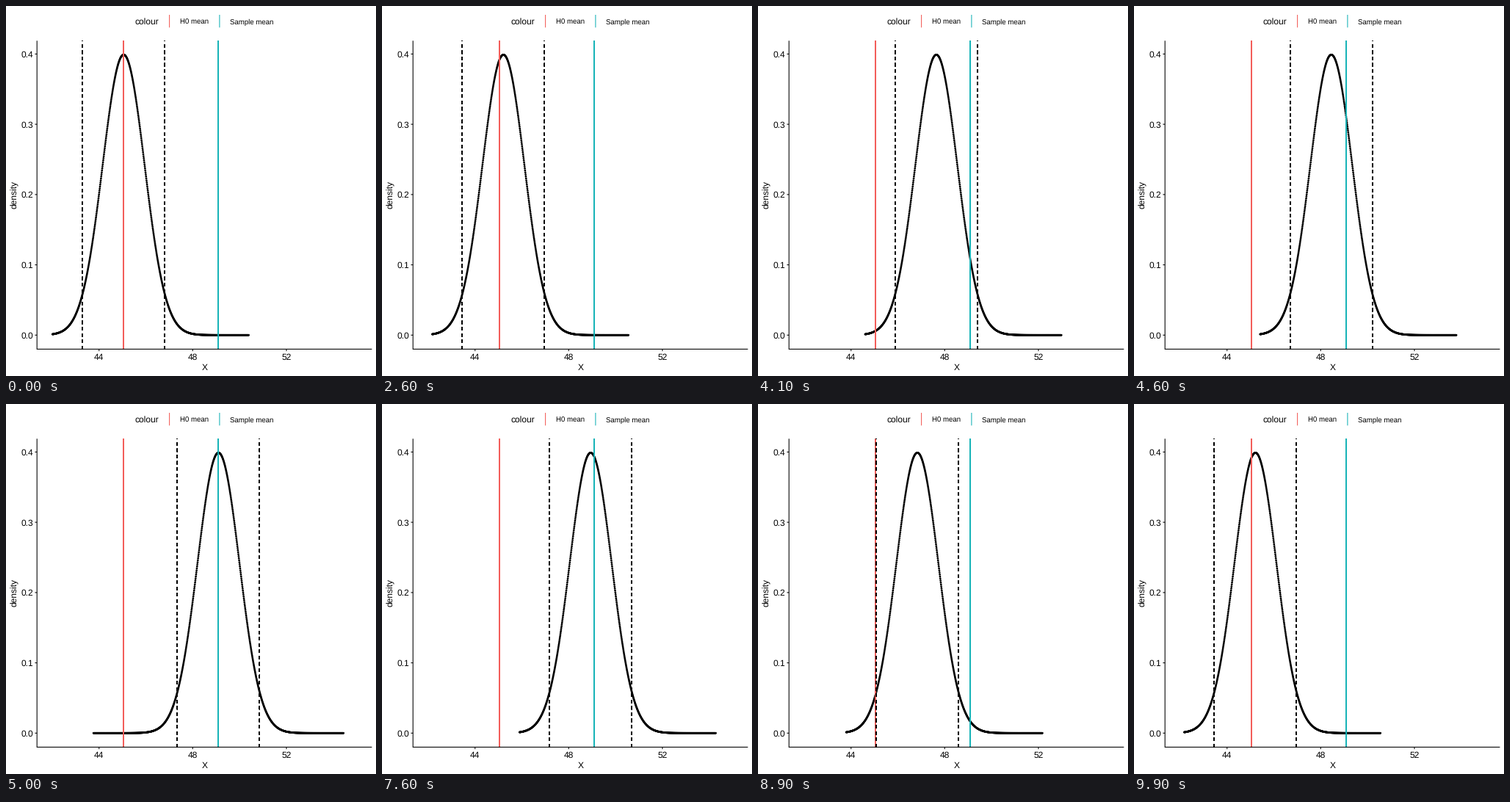
A matplotlib script for the animation above (10 s loop, 504 by 504 pixels).

```python
import numpy as np
import matplotlib.pyplot as plt
from matplotlib.animation import FuncAnimation

SIZE, DPI = 504, 72
LEFT, RIGHT, TOP, BOTTOM = 42.2, 498.4, 47.3, 467.4
X_MIN, X_MAX = 42, 55
RED, TEAL = "#F35E5A", "#17B3B7"
LW = 1.07

H0_MEAN, SAMPLE_MEAN = 45.05, 49.1
SD, REACH = 0.896, 5.337
HOLD, MOVE = 25, 25
FRAMES = 2 * (HOLD + MOVE)

plt.rcParams.update({"font.family": "Liberation Sans", "text.hinting": "none"})

PAD_X = (RIGHT - LEFT) / 22
PAD_Y = (BOTTOM - TOP) / 22
PEAK = 1 / np.sqrt(2 * np.pi)


def px(x):
    return LEFT + PAD_X + (x - X_MIN) / (X_MAX - X_MIN) * 20 * PAD_X


def py(y):
    return BOTTOM - PAD_Y - y / PEAK * 20 * PAD_Y


fig = plt.figure(figsize=(SIZE / DPI, SIZE / DPI), dpi=DPI, facecolor="white")
ax = fig.add_axes([0, 0, 1, 1])
ax.set(xlim=(0, SIZE), ylim=(SIZE, 0))
ax.axis("off")


def line(xs, ys, color="black", z=5):
    ax.plot(xs, ys, color=color, lw=LW, solid_capstyle="butt", snap=False, zorder=z)


def label(x, y, text, size=12, ha="left", **kw):
    ax.text(x, y, text, fontsize=size, ha=ha, va="baseline", **kw)


def vline_paths(x):
    # Stacked copies harden the antialiased edges.
    return [[(x, BOTTOM), (x, TOP)]] * 60


def vline(x, **kw):
    lines = ax.vlines([x], TOP, BOTTOM, lw=LW, snap=False, **kw)
    lines.set_segments(vline_paths(x))
    return lines


# Axes
line([LEFT, LEFT], [BOTTOM + LW / 2, TOP])
line([LEFT, RIGHT], [BOTTOM, BOTTOM])
for v in (44, 48, 52):
    line([px(v)] * 2, [BOTTOM, BOTTOM + 2.74])
    label(px(v), 482.3, str(v), ha="center")
for v in (0, 0.1, 0.2, 0.3, 0.4):
    line([LEFT - 2.74, LEFT], [py(v)] * 2)
    label(LEFT - 4.9, py(v) + 4.3, f"{v:.1f}", ha="right")
label((LEFT + RIGHT) / 2, 496, "X", ha="center")
ax.text(14.6, (TOP + BOTTOM) / 2, "density", fontsize=12, rotation=90,
        rotation_mode="anchor", ha="center", va="baseline")

# Legend
label(175.2, 25, "colour")
for x, color, text in ((222.6, RED, "H0 mean"), (290.9, TEAL, "Sample mean")):
    line([x, x], [12, 29.3], color)
    label(x + 14.3, 25.2, text, 9.6)

# Curve and reference lines
offsets = np.linspace(-REACH, REACH, 1000)
heights = py(PEAK * np.exp(-0.5 * (offsets / SD) ** 2))
in_range = H0_MEAN + offsets >= X_MIN
dots = ax.scatter(px(offsets), heights, s=2.8 ** 2, c=["black"] * len(offsets),
                  linewidths=0, zorder=2)
vline(px(H0_MEAN), color=RED, zorder=3)
vline(px(SAMPLE_MEAN), color=TEAL, zorder=3)
bounds = [vline(px(H0_MEAN), color="black", linestyle=(0, (4, 4)), zorder=4)
          for _ in range(2)]


def update(i):
    step = min(max(i - HOLD, 0), MOVE) - max(i - 2 * HOLD - MOVE, 0)
    mean = H0_MEAN + (SAMPLE_MEAN - H0_MEAN) * step / MOVE
    # The clipped left tail only shows once the curve has arrived.
    shown = in_range | (step == MOVE)
    dots.set_offsets(np.column_stack([px(mean + offsets), heights])[shown])
    for side, bound in zip((-1, 1), bounds):
        bound.set_segments(vline_paths(px(mean + side * 1.96 * SD)))
    return [dots, *bounds]


anim = FuncAnimation(fig, update, frames=FRAMES, interval=100, repeat=True,
                     repeat_delay=0, blit=False)
plt.show()
```
